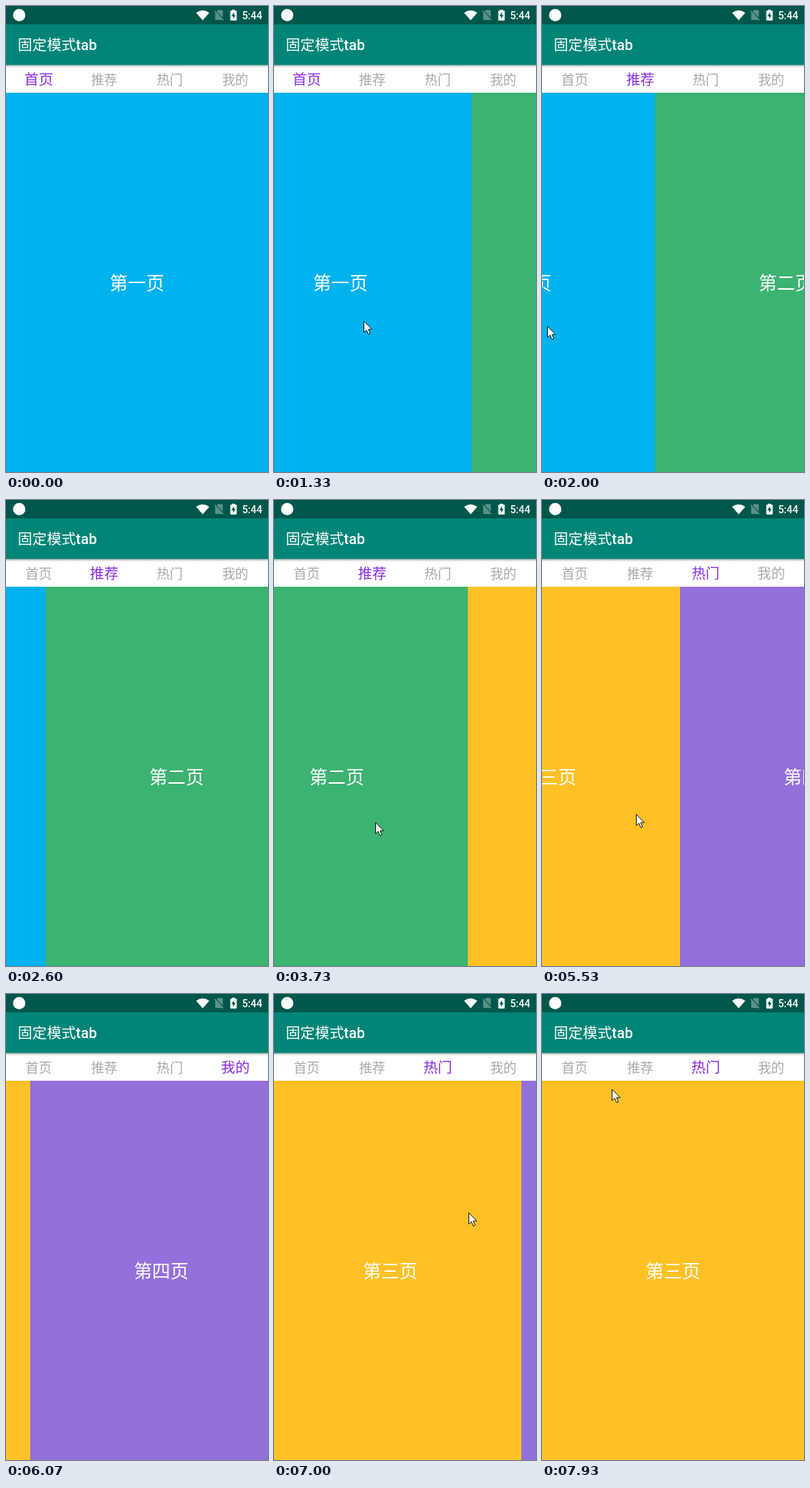
Recreate the animation shown at these times as an HTML page. Size 357 by 634 pixels, loop 8 s.

```html
<!DOCTYPE html>
<html lang="zh-CN">
<head>
<meta charset="utf-8">
<title>固定模式tab</title>
<style>
html, body { margin: 0; width: 100%; height: 100%; overflow: hidden; background: #fff; }
svg { display: block; width: 100%; height: 100%; }
text { font-family: "Noto Sans CJK SC", "Noto Sans CJK JP", "Noto Sans CJK", sans-serif; }
.latin { font-family: Roboto, sans-serif; font-weight: 500; }
.mid { text-anchor: middle; }
</style>
</head>
<body>
<svg viewBox="0 0 357 634" preserveAspectRatio="none">
  <defs>
    <linearGradient id="shade" x1="0" y1="0" x2="0" y2="1">
      <stop offset="0" stop-color="#000" stop-opacity=".3"/>
      <stop offset="1" stop-color="#000" stop-opacity="0"/>
    </linearGradient>
  </defs>
  <g id="pages"></g>
  <rect y="80" width="357" height="38" fill="#fff"/>
  <g id="tabs"></g>
  <rect y="80" width="357" height="4" fill="url(#shade)"/>
  <rect y="25" width="357" height="55.3" fill="#008577"/>
  <rect width="357" height="25" fill="#00574b"/>
  <text x="16" y="59.8" font-size="19.83" fill="#fff">固定模式<tspan class="latin">tab</tspan></text>

  <!-- status icons -->
  <g fill="#fff">
    <circle cx="18" cy="12.4" r="8.4"/>
    <path d="M259 9.3Q268 2.7 277 9.3L268 19.5Z"/>
    <path d="M287 7.2L288.8 5.6H294q1.4 0 1.4 1.4V15.7ZM284.8 6.2L296.8 18.9L295.8 19.9L294.4 18.5L293.7 18.9H286.4q-1.4 0-1.4-1.4V9.1L283.8 7.2Z" fill-opacity=".35"/>
    <path d="M305.6 7.2q0-.9.9-.9h1.7V5h3.6v1.3h1.7q.9 0 .9.9v11.6q0 .9-.9.9h-7q-.9 0-.9-.9Z"/>
    <text class="latin" x="321.7" y="17.7" font-size="13.9">5:44</text>
  </g>
  <path d="M310.7 8.5L307 13.8H309.4V17.6L312.9 12.2H310.7Z" fill="#00574b"/>

  <path id="cursor" d="M.5 .7V16L4 12.8L6.6 18.6L9 17.5L6.5 11.9H11.4Z" fill="#fff" stroke="#111" stroke-linejoin="round"/>
</svg>
<script>
const W = 357, LOOP = 8000, STEP = 1000 / 15;
const NAMES = ["首页", "推荐", "热门", "我的"];
const PAGES = [["一", "#00b2ee"], ["二", "#3cb371"], ["三", "#ffc125"], ["四", "#9370db"]];

// The pointer glides to a spot, or pulls the pager until it snaps to the next page.
const glide = (from, to, x, y) => ({ from, to, x, y });
const swipe = (from, to, rest, pull, rise) => ({ from, to, rest, pull, rise });
const ACTIONS = [
  glide(200, 733, 210, 422),
  swipe(867, 2600, 2800, 303, -20),
  glide(3000, 3333, 231, 442),
  swipe(3400, 4000, 4333, 162, 7),
  glide(4000, 4933, 297, 427),
  swipe(5000, 6067, 6267, 324, 0),
  glide(6200, 6467, 66, 315),
  swipe(6467, 6867, 7133, -199, 18),
  glide(7133, 7533, 211, 272),
  glide(7600, 7933, 95, 129)
];

const $ = id => document.getElementById(id);
const part = (t, a, b) => Math.min(1, Math.max(0, (t - a) / (b - a)));
const easeOut = (u, power) => 1 - (1 - u) ** power;

function add(parent, tag, attrs, text = "") {
  const el = document.createElementNS("http://www.w3.org/2000/svg", tag);
  for (const key in attrs) el.setAttribute(key, attrs[key]);
  el.textContent = text;
  return parent.appendChild(el);
}

function pose(t) {
  let x = 290, y = 660, scroll = 0;
  for (const a of ACTIONS) {
    const u = part(t, a.from, a.to);
    if (a.pull) {
      const k = u ** .94;
      x -= a.pull * k;
      y -= a.rise * k;
      const snap = easeOut(part(t, a.to, a.rest), 3);
      scroll += a.pull * k + (Math.sign(a.pull) * W - a.pull) * snap;
    } else {
      const k = easeOut(u, 1.4);
      x += (a.x - x) * k;
      y += (a.y - y) * k;
    }
  }
  return [x, y, scroll].map(Math.round);
}

PAGES.forEach(([num, fill], i) => {
  add($("pages"), "rect", { x: i * W, y: 118, width: W, height: 516, fill });
  add($("pages"), "text", { class: "mid", x: (i + .5) * W, y: 386.4, "font-size": 24.8, fill: "#fff" }, `第${num}页`);
});

const tabs = NAMES.map(name => add($("tabs"), "text", { class: "mid", "font-size": 17.85 }, name));

function draw(t) {
  const [x, y, scroll] = pose(t);
  $("pages").setAttribute("transform", `translate(${-scroll} 0)`);
  $("cursor").setAttribute("transform", `translate(${x} ${y})`);
  tabs.forEach((tab, i) => {
    const near = Math.max(0, 1 - Math.abs(scroll / W - i));
    tab.setAttribute("transform", `translate(${(i + .5) * W / 4} 106.8) scale(${1 + near / 9})`);
    tab.setAttribute("fill", near > .5 ? "#8a2be2" : "#a9a9a9");
  });
}

const start = performance.now();
function tick() {
  const t = (performance.now() - start) % LOOP;
  draw(Math.floor((t + 4) / STEP) * STEP % LOOP);
  requestAnimationFrame(tick);
}
tick();
</script>
</body>
</html>
```
